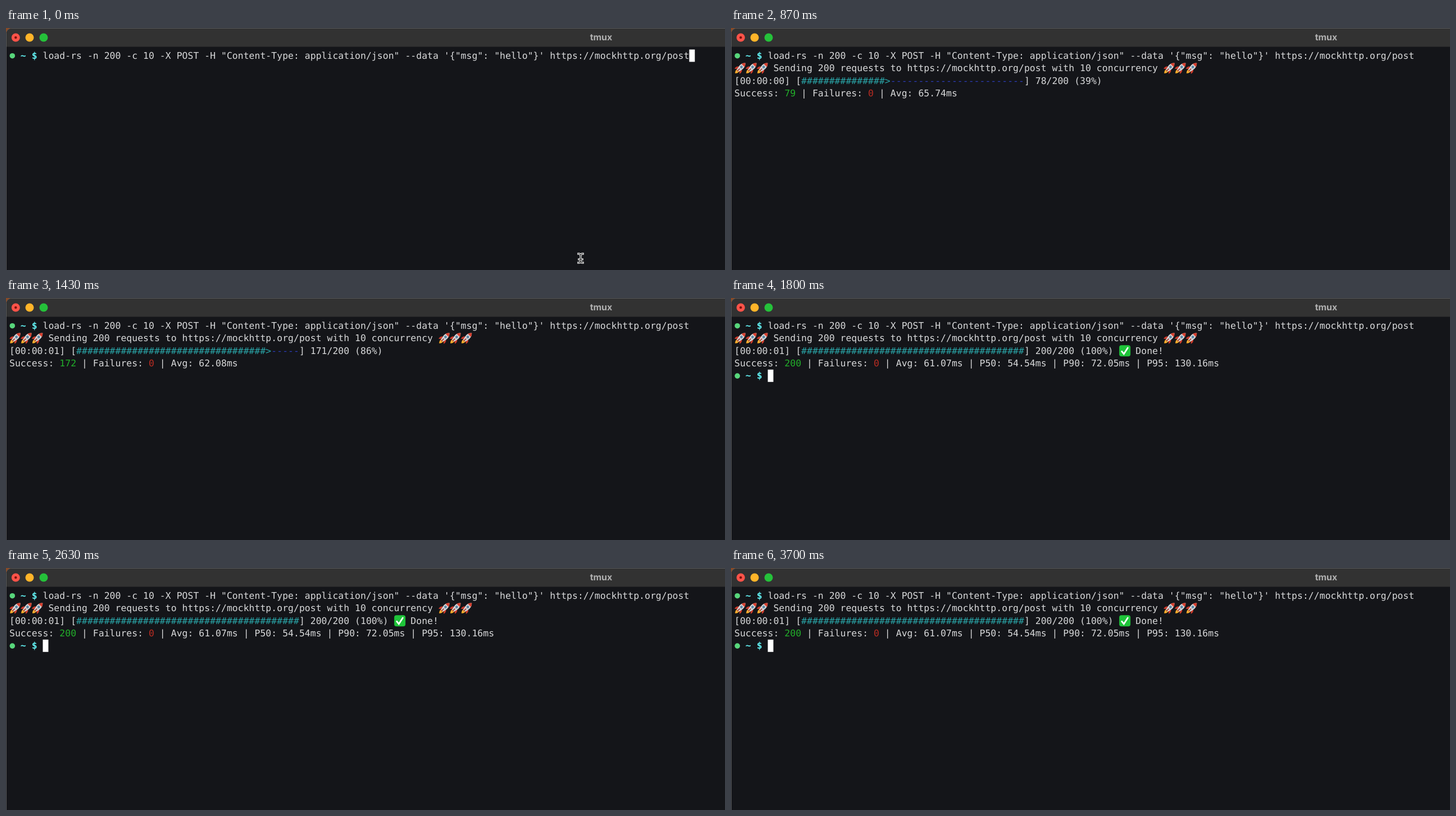
Recreate the animation shown at these times as an HTML page with a canvas. Size 1280 px wide and 432 px high, loop 3730 ms.

```html
<!DOCTYPE html>
<html lang="en">
<head>
<meta charset="utf-8">
<title>Load test in a terminal</title>
<style>
html, body { margin: 0; width: 100%; height: 100%; overflow: hidden; background: #141519; }
canvas { display: block; width: 1280px; height: 432px; }
</style>
</head>
<body>
<canvas id="stage" width="1280" height="432"></canvas>
<script>
const ctx = document.getElementById('stage').getContext('2d');
ctx.textRendering = 'geometricPrecision';

const LOOP = 3730, ENTER = 330, START = 365, DONE = 1590, REDRAW = 50;
const CELL = 9.921, LEFT = 6, TOP = 38.4, ROW = 22.35;
const BAR = 40, TOTAL = 200;
const FONT = '16.48px "DejaVu Sans Mono", monospace';
const TEXT = '#d8d9da', CYAN = '#2aa5a8', BLUE = '#2c3db8', GREEN = '#22b02a', RED = '#b92c22', PROMPT = '#62f0f2';
const URL_TEXT = 'https://mockhttp.org/post';
const COMMAND = `load-rs -n 200 -c 10 -X POST -H "Content-Type: application/json" --data '{"msg": "hello"}' ${URL_TEXT}`;

// Progress at known moments: time, bar count, successes, average latency
const progress = [
  [470, 1, 1, 104.2],
  [500, 11, 11, 116.59],
  [870, 78, 79, 65.74],
  [1430, 171, 172, 62.08],
  [DONE, 200, 200, 61.07]
];

const colX = col => LEFT + col * CELL;
const rowY = row => TOP + row * ROW;

function disc(x, y, r, color) {
  ctx.fillStyle = color;
  ctx.beginPath();
  ctx.arc(x, y, r, 0, 7);
  ctx.fill();
}

function shape(path, color) {
  ctx.fillStyle = color;
  ctx.fill(new Path2D(path));
}

// Writes [text, color] runs on the character grid
function write(row, col, runs, weight = '') {
  ctx.font = weight + FONT;
  for (const [text, color = TEXT] of runs) {
    ctx.fillStyle = color;
    for (const ch of text) {
      if (ch !== ' ') ctx.fillText(ch, colX(col), rowY(row) + 16.5);
      col++;
    }
  }
}

function block(row, col) {
  ctx.fillStyle = '#fff';
  ctx.fillRect(colX(col), rowY(row), CELL, 22);
}

function prompt(row) {
  disc(11.3, rowY(row) + 11.3, 4.8, '#58d67b');
  write(row, 2, [['~ $', PROMPT]], 'bold ');
}

function rocket(row, col) {
  ctx.save();
  ctx.translate(colX(col + 1) + 0.5, rowY(row) + 11);
  ctx.rotate(Math.PI / 4);
  shape('M-2.5 5Q-4 9 0 13Q4 9 2.5 5Z', '#f6a623');
  shape('M-1.2 5Q-2 8 0 10Q2 8 1.2 5Z', '#ffe36a');
  shape('M-3-1Q-8 2-6.5 8L-2.5 5ZM3-1Q8 2 6.5 8L2.5 5Z', '#c93a2b');
  shape('M0-13Q4.5-9 4.3-3Q4 2 2.6 6H-2.6Q-4-2-4.3-3Q-4.5-9 0-13Z', '#cfd5da');
  shape('M0-13Q3.2-10 4-7H-4Q-3.2-10 0-13Z', '#d8402f');
  disc(0, -3, 2.2, '#53636f');
  disc(0, -3, 1.4, '#4b9fd8');
  shape('M-.8 1H.8V8H-.8Z', '#a82e25');
  ctx.restore();
}

function check(row, col) {
  const x = colX(col) + 0.6, y = rowY(row) + 1.2;
  ctx.fillStyle = '#1fc43a';
  ctx.beginPath();
  ctx.roundRect(x, y, 20, 20, 4);
  ctx.fill();
  ctx.strokeStyle = '#fff';
  ctx.lineWidth = 2.8;
  ctx.lineCap = 'round';
  ctx.stroke(new Path2D(`M${x + 4.6} ${y + 11}l3.6 4.6l7-11`));
}

function pointer(x, y) {
  const beam = new Path2D(`M${x - 4} ${y - 8}q4 0 4 3q0-3 4-3M${x} ${y - 5}v10M${x - 3} ${y + 2}h6M${x - 4} ${y + 8}q4 0 4-3q0 3 4 3`);
  ctx.lineCap = 'square';
  for (const [color, width] of [['#f4f4f4', 3.4], ['#111', 1.2]]) {
    ctx.strokeStyle = color;
    ctx.lineWidth = width;
    ctx.stroke(beam);
  }
}

function windowFrame() {
  ctx.fillStyle = '#8a4a25';
  ctx.fillRect(0, 0, 12, 12);
  ctx.fillStyle = '#57585a';
  ctx.beginPath();
  ctx.roundRect(0, 0, 1300, 450, 10);
  ctx.fill();
  ctx.fillStyle = '#141519';
  ctx.beginPath();
  ctx.roundRect(1, 1, 1300, 450, 9);
  ctx.fill();
  ctx.fillStyle = '#323232';
  ctx.beginPath();
  ctx.roundRect(1, 1, 1300, 32.5, [9, 0, 0, 0]);
  ctx.fill();
  disc(17.3, 17, 7.5, '#ff5349');
  disc(17.3, 17, 2.3, '#7d130e');
  disc(42, 17, 7.5, '#ffb429');
  disc(67, 17, 7.5, '#25c13a');
  ctx.font = 'bold 16px Inter, sans-serif';
  ctx.fillStyle = '#b0b0b0';
  ctx.textAlign = 'center';
  ctx.fillText('tmux', 1059.5, 22);
  ctx.textAlign = 'left';
}

function statsAt(t) {
  if (t >= DONE) return progress.at(-1).slice(1);
  const i = progress.findLastIndex(p => p[0] <= t);
  const a = progress[i], b = progress[i + 1];
  const k = Math.floor((t - a[0]) / REDRAW) * REDRAW / (b[0] - a[0]);
  const mix = (p, q) => p + (q - p) * k;
  const count = Math.round(mix(a[1], b[1])), ok = Math.round(mix(a[2], b[2]));
  // Latency total grows evenly, so the average follows from it
  return [count, ok, mix(a[2] * a[3], b[2] * b[3]) / mix(a[2], b[2])];
}

function report(t) {
  const [count, ok, avg] = statsAt(t);
  const done = t >= DONE;
  const filled = Math.floor(count / TOTAL * BAR);
  const head = '#'.repeat(filled) + (filled < BAR ? '>' : '');
  const seconds = Math.min(1, Math.floor((t - START) / 1000));
  write(2, 0, [
    [`[00:00:0${seconds}] [`], [head, CYAN], ['-'.repeat(BAR - head.length), BLUE],
    [`] ${count}/${TOTAL} (${Math.round(count / TOTAL * 100)}%)`]
  ]);
  const tail = done ? ' | P50: 54.54ms | P90: 72.05ms | P95: 130.16ms' : '';
  write(3, 0, [
    ['Success: '], [String(ok), GREEN], [' | Failures: '], ['0', RED],
    [` | Avg: ${avg.toFixed(2)}ms${tail}`]
  ]);
  if (done) {
    check(2, 69);
    write(2, 72, [['Done!']]);
    prompt(4);
    block(4, 6);
  }
}

function draw(t) {
  windowFrame();
  prompt(0);
  write(0, 6, [[COMMAND]]);
  if (t < ENTER) {
    block(0, 6 + COMMAND.length);
    pointer(1023, 411);
    return;
  }
  if (t < START) return block(1, 0);
  for (const col of [0, 2, 4, 77, 79, 81]) rocket(1, col);
  write(1, 7, [[`Sending ${TOTAL} requests to ${URL_TEXT} with 10 concurrency`]]);
  if (t < progress[0][0]) block(2, 0);
  else report(t);
}

const begin = performance.now();
function tick() {
  draw((performance.now() - begin) % LOOP);
  requestAnimationFrame(tick);
}
tick();
</script>
</body>
</html>
```
